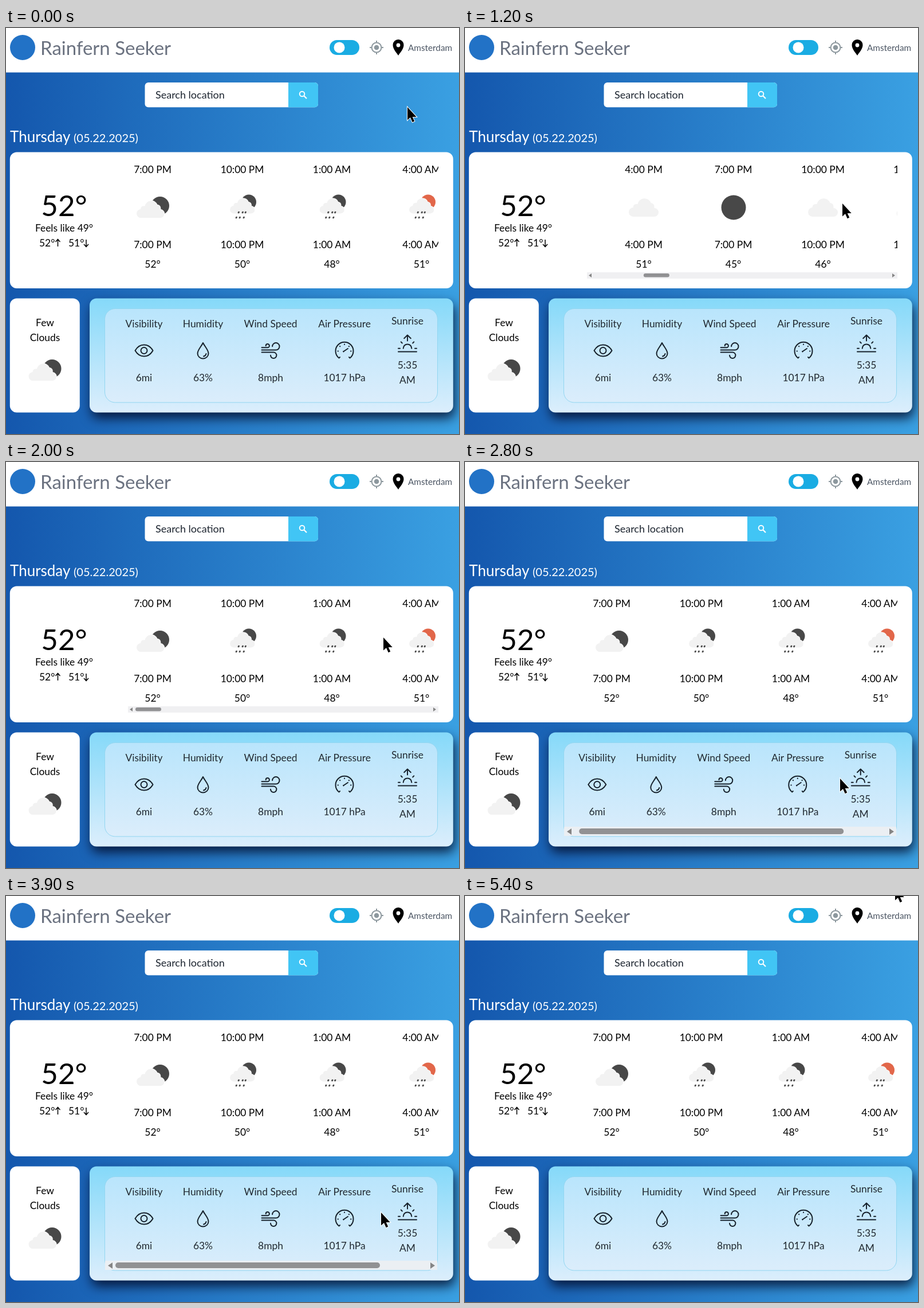
These frames come from a looping animation (791 by 708 pixels, 5.5 s). An HTML page:

```html
<!DOCTYPE html>
<html lang="en">
<head>
<meta charset="utf-8">
<title>Weather dashboard</title>
<style>
  html, body { margin: 0; width: 100%; height: 100%; overflow: hidden; }
  svg { display: block; width: 791px; height: 708px; font: 17.4px Lato, sans-serif; }
  .mid { text-anchor: middle; }
  .line { fill: none; stroke: #17222c; stroke-width: 2; stroke-linecap: round; stroke-linejoin: round; }
  #panel { filter: drop-shadow(3px 10px 10px rgba(0, 4, 30, .8)); }
</style>
</head>
<body>
<svg viewBox="0 0 791 708">
  <defs>
    <linearGradient id="sky"><stop stop-color="#1457ad"/><stop offset="1" stop-color="#3aa0e2"/></linearGradient>
    <linearGradient id="ice" x2="0" y2="1"><stop stop-color="#85d9f9"/><stop offset="1" stop-color="#dceefc"/></linearGradient>
    <linearGradient id="glass" x2="0" y2="1"><stop stop-color="#b9e5fc"/><stop offset="1" stop-color="#dbedfb"/></linearGradient>
    <clipPath id="hourClip"><path d="M213 225h542v220H213z"/></clipPath>
    <clipPath id="detailClip"><path d="M173 490h580v163H173z"/></clipPath>
    <path id="cloud" fill="#f2f2f2" d="M8 33a8 8 0 0 1-1-16q0-7 8-6a12 12 0 0 1 23-2q7 1 6 9a7.5 7.5 0 0 1 0 15z"/>
    <g id="few">
      <circle cx="12.500" cy="-3" r="16" fill="#484848"/>
      <use href="#cloud" transform="translate(-28 -12.700) scale(.93)" stroke="#fff" stroke-width="2" paint-order="stroke"/>
    </g>
    <g id="cloudy"><use href="#cloud" x="-26" y="-17"/></g>
    <g id="clear"><circle r="21.5" fill="#484848"/></g>
    <g id="rain">
      <circle cx="11" cy="-9.5" r="13"/>
      <use href="#cloud" transform="translate(-21.500 -17) scale(.83)" stroke="#fff" stroke-width="2" paint-order="stroke"/>
      <path d="M-6 7l-1.500 3M1 7l-1.500 3M6 7l-1.500 3M-10 16l-1.500 3M-4 16l-1.500 3M3 16l-1.500 3" stroke="#484848" stroke-width="2.700"/>
    </g>
    <g id="rainNight" fill="#484848"><use href="#rain"/></g>
    <g id="rainDay" fill="#e2674a"><use href="#rain"/></g>
  </defs>

  <rect width="791" height="708" fill="url(#sky)"/>
  <rect width="791" height="77.500" fill="#fff"/>
  <circle cx="29" cy="34" r="22" fill="#2272c6"/>
  <text x="60" y="47" font-size="33" fill="#6b7280">Rainfern Seeker</text>
  <rect x="565" y="21" width="52" height="26" rx="13" fill="#1aace3"/>
  <circle cx="582" cy="34" r="9.5" fill="#fff"/>
  <g transform="translate(647 34)" fill="none" stroke="#8d989e" stroke-width="2">
    <circle r="8.4"/><path d="M0-12v4M0 8v4M-12 0h4M8 0h4"/><circle r="4.3" fill="#8d989e" stroke="none"/>
  </g>
  <path fill-rule="evenodd" d="M685 48c-3-5-9.5-11-9.5-18.5a9.5 9.5 0 0 1 19 0C694.500 37 688 43 685 48zM681.600 30a3.400 3.400 0 1 0 6.800 0a3.400 3.400 0 1 0-6.800 0z"/>
  <text x="702" y="40" font-size="15.300" fill="#4b5563">Amsterdam</text>

  <rect x="242.500" y="95" width="302.500" height="43.300" rx="6" fill="#fff"/>
  <path d="M493 95h46a6 6 0 0 1 6 6v31.300a6 6 0 0 1-6 6h-46z" fill="#41c5f5"/>
  <path d="M520.500 118.500l4.500 4.500" stroke="#fff" stroke-width="2.200"/>
  <circle cx="517" cy="115" r="4.300" fill="none" stroke="#fff" stroke-width="1.900"/>
  <text x="261" y="123" font-size="18" fill="#1d2530">Search location</text>
  <text x="7" y="199" font-size="26" fill="#fff">Thursday</text>
  <text x="118" y="199" font-size="20" fill="#fff">(05.22.2025)</text>

  <rect x="6.800" y="216.500" width="774" height="237.500" rx="12" fill="#fff"/>
  <text class="mid" x="101.500" y="328" font-size="51">52°</text>
  <text class="mid" x="101.500" y="355">Feels like 49°</text>
  <text x="58" y="381">52°</text>
  <text x="109" y="381">51°</text>
  <path d="M90.500 381v-12m-4 4l4-4.500 4 4.500M140 369v12m-4-4l4 4.500 4-4.500" fill="none" stroke="#000" stroke-width="1.500"/>
  <g clip-path="url(#hourClip)"><g id="hours" class="mid"></g></g>
  <g id="hourBar">
    <path d="M213 426h542v11H213z" fill="#f0f0f2"/>
    <path d="M221 428v7l-5-3.500zM746 428v7l5-3.500z" fill="#858585"/>
    <rect id="hourThumb" y="428" width="45" height="6.500" rx="3.250" fill="#919193"/>
  </g>

  <rect x="6.800" y="471.500" width="122" height="199" rx="12" fill="#fff"/>
  <text class="mid" x="68" y="520">Few</text>
  <text class="mid" x="68" y="546">Clouds</text>
  <use href="#few" x="68" y="597"/>

  <rect id="panel" x="146" y="471.500" width="634.800" height="199" rx="12" fill="url(#ice)"/>
  <rect x="172.500" y="489.500" width="581" height="163.500" rx="18" fill="url(#glass)" stroke="#92d6f1"/>
  <g clip-path="url(#detailClip)"><g id="details" class="mid" fill="#212930"></g></g>
  <g id="detailBar">
    <path d="M173 636h580v16H173z" fill="#ebeff3"/>
    <path d="M186 639v11l-8-5.500zM741 639v11l8-5.500z" fill="#858585"/>
    <rect id="detailThumb" y="639" width="462" height="10" rx="5" fill="#919193"/>
  </g>
  <path id="cursor" d="M0 0V22.500L5 18l3.700 8.200 3.500-1.600L8.700 17h7z" stroke="#fff" stroke-width="2" paint-order="stroke"/>
</svg>

<script>
const LOOP = 5500, STEP = 100, PITCH = 156.5, HOURS = 40;
const el = id => document.getElementById(id);
const text = (x, y, s) => `<text x="${x}" y="${y}">${s}</text>`;

// Three-hourly forecast
const skies = ['few', 'rainNight', 'rainNight', 'rainDay', 'rainDay', 'cloudy', 'cloudy', 'cloudy', 'clear', 'cloudy', 'few'];
const temps = [52, 50, 48, 51, 50, 52, 53, 51, 45, 46, 45];
el('hours').innerHTML = Array.from({ length: HOURS }, (_, i) => {
  const x = 256 + i * PITCH, hour = (19 + i * 3) % 24, k = i % skies.length;
  const label = `${hour % 12 || 12}:00 ${hour < 12 ? 'AM' : 'PM'}`;
  return text(x, 253, label) + `<use href="#${skies[k]}" x="${x + 0.5}" y="313"/>` +
    text(x, 384, label) + text(x, 418, temps[k] + '°');
}).join('');

// Current conditions
const sun = 'M-16 14.5H16M-16 8.700h3M13 8.700h3M-7.300 8.700a7.300 7.300 0 0 1 14.600 0M-11.300-2.600l2.100 2.100M11.300-2.600l-2.100 2.100M0-14.500v10';
const details = [
  ['Visibility', 241, 'M-15.500 0C-12-6-6-10 0-10S12-6 15.500 0C12 6 6 10 0 10S-12 6-15.500 0zM-5.500 0a5.500 5.500 0 1 0 11 0a5.500 5.500 0 1 0-11 0z', '6mi'],
  ['Humidity', 344, 'M0-13.500C-3-7-9.500-1-9.500 5a9.500 9 0 0 0 19 0C9.500-1 3-7 0-13.500zM5.500 5.500q-1 4-4.500 4.500', '63%'],
  ['Wind Speed', 462, 'M-15.500-5.200H-5.200a3.100 3.100 0 1 0-3.100-3.100M-15.500-1H9.300a6.200 6.200 0 1 0-6.200-6.200M-15.500 3.100H5.200a5.200 5.200 0 1 1-5.200 5.200', '8mph'],
  ['Air Pressure', 591, 'M-9.500 13A15.500 15.500 0 1 1 9.500 13L8 11.500M-9.500 13l1.500-1.500M-11.500 1h.5M11.500 1h-.5M0-11v.5M-8-7.500l.3.300M8-7.500l-.3.300M-1.500 1.500L6-3.500M-2 1.500l.5.500', '1017 hPa'],
  ['Sunrise', 701, sun + 'M-5.800-8.700l5.800-5.800 5.800 5.800', '5:35', 'AM'],
  ['Sunset', 791.5, sun + 'M-5.800-10.200l5.800 5.800 5.800-5.800', '9:39', 'PM']
];
el('details').innerHTML = details.map(([name, x, icon, value, half]) =>
  text(x, half ? 517 : 522, name) +
  `<path class="line" transform="translate(${x} ${half ? 550 : 562.5})" d="${icon}"/>` +
  text(x, half ? 594 : 616, value) + (half ? text(x, 620, half) : '')).join('');

// Eased interpolation through [time, ...values] keys
function track(keys, t) {
  const i = keys.findIndex(k => k[0] > t);
  if (i < 1) return keys[i ? keys.length - 1 : 0].slice(1);
  const a = keys[i - 1], b = keys[i], u = (t - a[0]) / (b[0] - a[0]), e = u * u * (3 - 2 * u);
  return a.slice(1).map((v, j) => v + (b[j + 1] - v) * e);
}
const cursorKeys = [[500, 701, 138], [900, 659, 306], [2100, 659, 306], [2500, 655, 552],
  [4000, 655, 552], [4400, 687, 103], [4800, 746, -8], [5400, 751, -15]];
const hourKeys = [[800, 0], [1200, 1039.5], [1400, 1039.5], [1900, 0]];
const detailKeys = [[2700, 0], [3200, 98.5], [3500, 98.5], [3900, 0]];

function draw(now) {
  const t = Math.floor(now % LOOP / STEP) * STEP;
  const [x, y] = track(cursorKeys, t), [hour] = track(hourKeys, t), [detail] = track(detailKeys, t);
  el('cursor').setAttribute('transform', `translate(${x} ${y})`);
  el('hours').setAttribute('transform', `translate(${-hour})`);
  el('details').setAttribute('transform', `translate(${-detail})`);
  el('hourThumb').setAttribute('x', 226 + hour * 517 / (HOURS * PITCH));
  el('detailThumb').setAttribute('x', 191 + detail * 0.8);
  el('hourBar').style.display = y > 217 && y < 454 ? '' : 'none';
  el('detailBar').style.display = y > 490 && y < 653 ? '' : 'none';
}
const start = performance.now();
(function tick() {
  draw(performance.now() - start);
  requestAnimationFrame(tick);
})();
</script>
</body>
</html>
```
